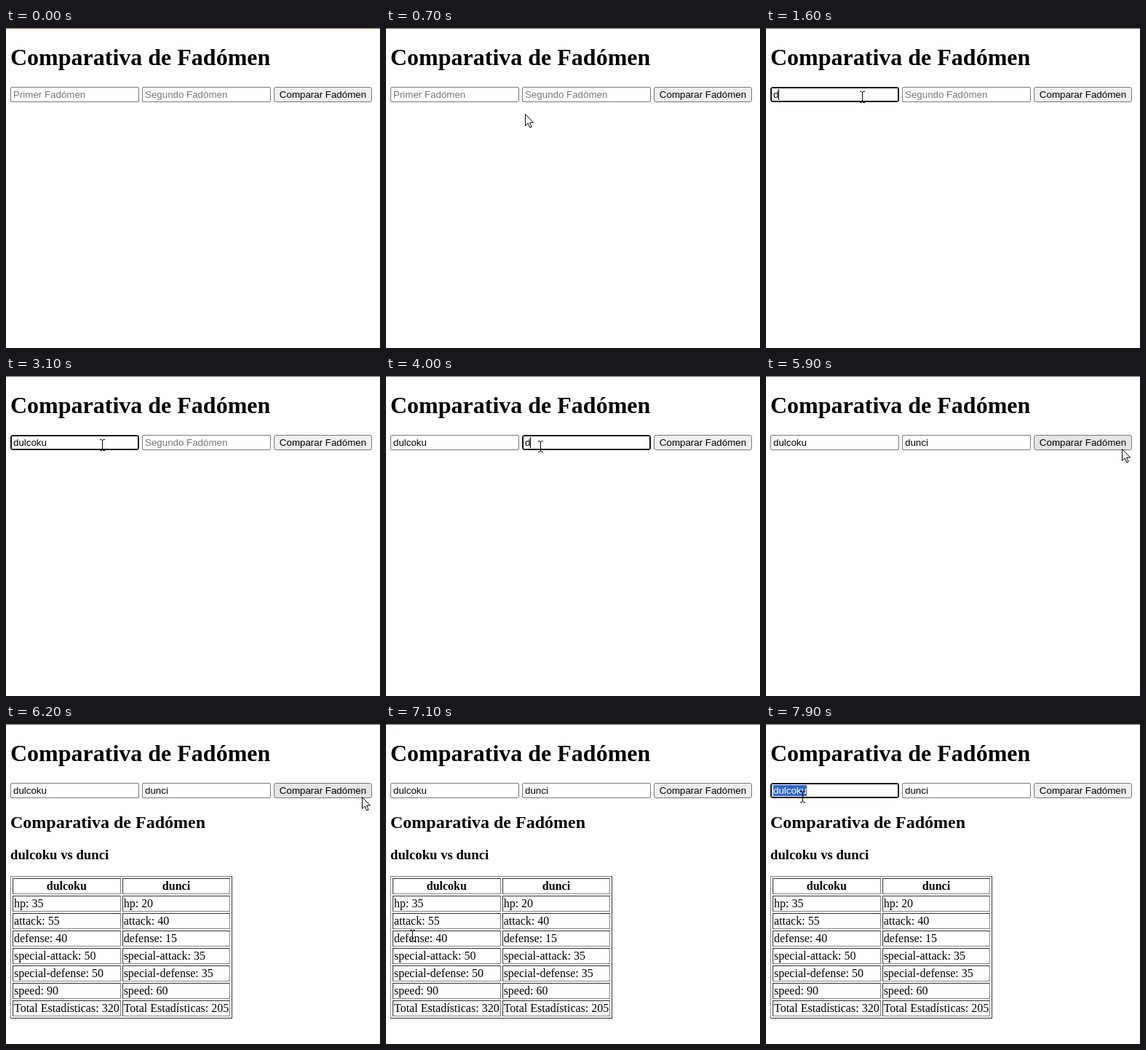
Recreate the animation shown at these times as an HTML page. Size 514 by 440 pixels, loop 8 s.

```html
<!DOCTYPE html>
<html lang="es">
<head>
<meta charset="utf-8">
<style>
html, body { margin: 0; width: 100%; height: 100%; overflow: hidden; background: #fff; }
body { position: relative; color: #000; font: 16px/18px "Liberation Serif", "Times New Roman", serif; }
body > *, #result > * { position: absolute; margin: 0; left: 6px; white-space: nowrap; }
#result { left: 0; top: 0; }
#edge { left: 0; top: 0; width: 100%; height: 1px; background: #5f6c59; }
#edge.warm { background: #6e695c; box-shadow: 0 3px 3px #fffbe0; }
h1 { top: 22px; font-size: 32px; line-height: 37px; }
h2 { top: 122px; font-size: 24px; line-height: 27px; }
h3 { top: 169px; font-size: 18.72px; line-height: 22px; }
table { top: 209px; }
.field, #button {
  top: 81px; height: 21px; box-sizing: border-box; border: 1px solid #767676;
  font: 13.333px/19px "Liberation Sans", Arial, sans-serif;
}
.field { width: 177px; padding-left: 3px; border-radius: 2px; }
.field.focus { border-color: #101010; box-shadow: inset 0 0 0 1px #101010; border-radius: 3px; }
.field.empty { color: #757575; }
.field.picked span { background: #3067cb; color: #fff; }
.field i { position: absolute; top: 2px; width: 1px; height: 15px; background: #000; }
#second { left: 187px; }
#button { left: 368px; width: 135px; text-align: center; border-radius: 3px; background: #efefef; }
#button.hover { background: #e5e5e5; }
#pointer { left: 0; top: 0; overflow: visible; }
</style>
</head>
<body>
<div id="edge"></div>
<h1>Comparativa de Fadómen</h1>
<div id="first" class="field"></div>
<div id="second" class="field"></div>
<div id="button">Comparar Fadómen</div>
<div id="result">
  <h2>Comparativa de Fadómen</h2>
  <h3>dulcoku vs dunci</h3>
  <table border="1"></table>
</div>
<svg id="pointer" width="1" height="1">
  <path id="arrow" d="M.5 .5V16.5L4.2 13 6.8 19 9.2 18 6.6 12H11.6Z" fill="#fff" stroke="#000"/>
  <path id="beam" d="M-3 -7.5H-1L.5 -6.5 2 -7.5H4M.5 -6.5V6.5M-3 7.5H-1L.5 6.5 2 7.5H4" fill="none" stroke="#000"/>
</svg>
<script>
const $ = id => document.getElementById(id);
const LOOP = 8000, STEP = 100;

const stats = [
  ['hp', 35, 20], ['attack', 55, 40], ['defense', 40, 15], ['special-attack', 50, 35],
  ['special-defense', 50, 35], ['speed', 90, 60], ['Total Estadísticas', 320, 205]
];
document.querySelector('table').innerHTML = '<tr><th>dulcoku<th>dunci' +
  stats.map(([name, a, b]) => `<tr><td>${name}: ${a}<td>${name}: ${b}`).join('');

const fields = [
  { el: $('first'), hint: 'Primer Fadómen', word: 'dulcoku', keys: [1600, 1700, 1900, 2100, 2300, 2400, 2600] },
  { el: $('second'), hint: 'Segundo Fadómen', word: 'dunci', keys: [4000, 4100, 4200, 4300, 4500] }
];

// time, x, y of the pointer
const path = [
  [0, 530, 250], [100, 512, 240], [900, 132, 95], [3100, 132, 95], [3500, 212, 97], [5400, 212, 97],
  [5800, 489, 100], [6300, 489, 100], [6700, 300, 408], [7100, 36, 291], [7300, 40, 380],
  [7600, 50, 100], [LOOP, 50, 100]
];

const within = (t, ...spans) => spans.some(([a, b]) => t >= a && t < b);

function pointerAt(t) {
  const n = path.findIndex(p => p[0] > t);
  const [t0, x0, y0] = path[n - 1], [t1, x1, y1] = path[n];
  const k = (t - t0) / (t1 - t0), e = k * k * (3 - 2 * k);
  return [x0 + (x1 - x0) * e, y0 + (y1 - y0) * e];
}

function drawField({ el, hint, word, keys }, focus, caret, picked) {
  const text = word.slice(0, keys.filter(k => k <= lastTime).length);
  const mark = caret ? '<i></i>' : '';
  el.className = 'field' + (text ? '' : ' empty') + (focus ? ' focus' : '') + (picked ? ' picked' : '');
  el.innerHTML = text ? `<span>${text}</span>${mark}` : `${mark}<span>${hint}</span>`;
}

let lastTime = -1;
function draw(t) {
  lastTime = t;
  const caret = within(t, [1000, 1500], [1600, 3100], [3500, 4600], [4800, 5300]);
  const onFirst = within(t, [1000, 3500], [7700, LOOP]);
  const onSecond = within(t, [3500, 5900]);
  drawField(fields[0], onFirst, onFirst && caret, t >= 7700);
  drawField(fields[1], onSecond, onSecond && caret, false);

  const [x, y] = pointerAt(t).map(Math.round);
  const onRow = y > 80 && y < 102;
  const overText = onRow && (within(x, [6, 183], [187, 364])) ||
    t >= 6100 && within(x, [9, 130]) && within(y, [212, 402]);
  $('button').className = onRow && within(x, [368, 503]) ? 'hover' : '';
  $('arrow').style.display = overText ? 'none' : '';
  $('beam').style.display = overText ? '' : 'none';
  $('pointer').style.transform = `translate(${x}px, ${y}px)`;

  $('edge').className = t < 100 ? 'warm' : '';
  $('result').style.display = t >= 6100 ? '' : 'none';
}

const start = performance.now();
function tick() {
  const t = Math.floor((performance.now() - start) % LOOP / STEP) * STEP;
  if (t !== lastTime) draw(t);
  requestAnimationFrame(tick);
}
tick();
</script>
</body>
</html>
```
